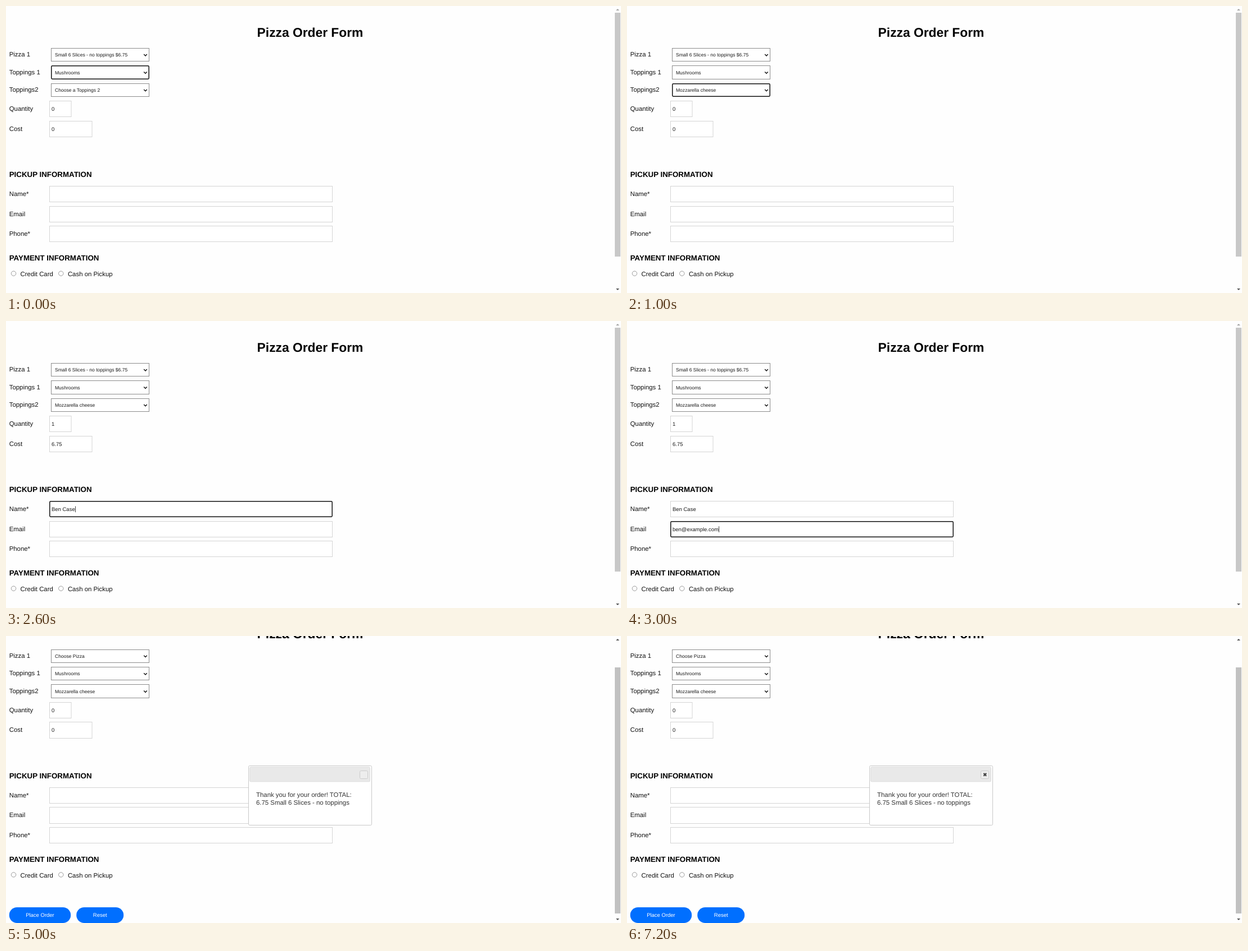
An HTML page that plays this animation: 1094x512 px, repeating every 8000 ms.

```html
<!DOCTYPE html>
<html lang="en">
<head>
<meta charset="utf-8">
<title>Pizza Order Form</title>
<style>
  html, body { margin: 0; width: 100%; height: 100%; overflow: hidden; background: #fefefe; }
  svg { display: block; font-family: "Liberation Sans", Arial, sans-serif; text-rendering: geometricPrecision; }
</style>
</head>
<body>
<svg id="stage" width="1094" height="512" viewBox="0 0 1094 512"></svg>
<script>
const stage = document.getElementById('stage');
const small = 'Small 6 Slices - no toppings $6.75', mushrooms = 'Mushrooms', cheese = 'Mozzarella cheese';
const person = 'Ben Case', email = 'ben@example.com', phone = '5550102346';

// Each step changes part of the form; focus names the active field.
const steps = [
  { scroll: 0, pizza: small, top1: mushrooms, top2: 'Choose a Toppings 2', qty: '0', cost: '0',
    name: '', email: '', phone: '', focus: 'top1' },
  { top2: cheese, focus: 'top2' },
  { qty: '1', cost: '6.75', name: person, focus: 'name' },
  { email, focus: 'email' },
  { phone, focus: 'phone' },
  { scroll: 51.3, pizza: 'Choose Pizza', qty: '0', cost: '0', name: '', email: '', phone: '',
    focus: '', dialog: true },
  { cross: true }
];
const states = steps.map((_, i) => Object.assign({}, ...steps.slice(0, i + 1)));

const snap = v => Math.floor(v) + 0.5;
const text = (s, x, y, size, attrs = '') =>
  `<text x="${x}" y="${y}" font-size="${size}" ${attrs}>${s}</text>`;
const rect = (x, y, w, h, fill, attrs = '') =>
  `<rect x="${x}" y="${y}" width="${w}" height="${h}" fill="${fill}" ${attrs}/>`;
const path = (d, attrs) => `<path d="${d}" ${attrs}/>`;

function render(s) {
  const at = y => y - s.scroll;
  const label = (str, y) => text(str, 5.7, at(y), 11.4, 'fill="#111"');
  const heading = (str, y) => text(str, 5.7, at(y), 13.33, 'font-weight="bold"');

  function box(key, x, y, w, h, border) {
    const top = snap(at(y)), tall = snap(at(y + h)) - top;
    return s.focus === key
      ? rect(x + 0.3, top + 0.3, w - 0.6, tall - 0.6, '#fff', 'rx="1.6" stroke="#111" stroke-width="1.5"')
      : rect(x, top, w, tall, '#fff', `stroke="${border}"`);
  }
  function select(key, title, i) {
    const y = 75.3 + 31.4 * i;
    return label(title, y + 14.8) + box(key, 80.5, y, 174, 23.6, '#8c8c8c') +
      text(s[key], 87, at(y + 14.8), 8.55, 'fill="#1a1a1a"') +
      path(`M245.2 ${at(y + 10.8)}l2.8 2.8 2.8-2.8`, 'fill="none" stroke="#111" stroke-width="1.4"');
  }
  function input(key, title, y, w) {
    return label(title, y + 17.4) + box(key, 77.5, y, w, 28.2, '#d4d4d4') +
      text(s[key], 81, at(y + 17.6), 9.49, `id="${key}" fill="#1a1a1a"`);
  }
  function radio(title, x) {
    return `<circle cx="${x}" cy="${at(477.2)}" r="4.2" fill="#fff" stroke="#808080" stroke-width=".8"/>` +
      text(title, x + 12.1, at(482.3), 11.4, 'fill="#111"');
  }
  function button(title, x, w) {
    return rect(x, at(535.3), w, 28, '#006fff', 'rx="14"') +
      text(title, x + w / 2, at(552.7), 9.49, 'fill="#fff" text-anchor="middle"');
  }
  function dialog() {
    return rect(431.5, 231.5, 219, 106, '#fff', 'rx="2" stroke="#c8c8c8"') +
      rect(433.5, 233.8, 214, 26, '#e9e9e9', 'rx="2" stroke="#ddd"') +
      rect(629.5, 240.5, 14, 14, '#ededed', 'rx="2" stroke="#ccc"') +
      (s.cross ? path('M634.4 244.9l4.8 4.8m0-4.8l-4.8 4.8', 'stroke="#444" stroke-width="2.2"') : '') +
      text('Thank you for your order! TOTAL:', 445, 287.4, 11.4, 'fill="#333"') +
      text('6.75 Small 6 Slices - no toppings', 445, 300.5, 11.4, 'fill="#333"');
  }
  function scrollbar() {
    const [y, h, color, up] = s.scroll ? [56, 439, '#c1c1c1', '#505050'] : [12, 435, '#c8c8c8', '#a3a3a3'];
    return rect(1083, y, 10, h, color) +
      path('M1085 8l3-3 3 3z', `fill="${up}"`) + path('M1085 504l3 3 3-3z', 'fill="#505050"');
  }

  stage.innerHTML =
    text('Pizza Order Form', 541, at(55), 22.8, 'font-weight="bold" text-anchor="middle"') +
    select('pizza', 'Pizza 1', 0) + select('top1', 'Toppings 1', 1) + select('top2', 'Toppings2', 2) +
    input('qty', 'Quantity', 169.4, 38.5) + input('cost', 'Cost', 205.1, 75.5) +
    heading('PICKUP INFORMATION', 305) +
    input('name', 'Name*', 321.4, 503) + input('email', 'Email', 357.2, 503) +
    input('phone', 'Phone*', 392.7, 503) +
    heading('PAYMENT INFORMATION', 454) +
    radio('Credit Card', 13.5) + radio('Cash on Pickup', 97.8) +
    button('Place Order', 5.7, 109.5) + button('Reset', 125.2, 84) +
    (s.dialog ? dialog() : '') + scrollbar();

  // Text caret after the typed value
  const field = stage.querySelector(`#${s.focus || 'none'}`);
  if (field) {
    const x = 81.4 + field.getComputedTextLength(), y = +field.getAttribute('y');
    stage.insertAdjacentHTML('beforeend', rect(x, y - 8.6, 0.8, 10.8, '#111'));
  }
}

let shown = -1;
function tick() {
  const step = Math.min(6, Math.floor(performance.now() % 8000 / 1000));
  if (step !== shown) render(states[shown = step]);
  requestAnimationFrame(tick);
}
tick();
</script>
</body>
</html>
```
